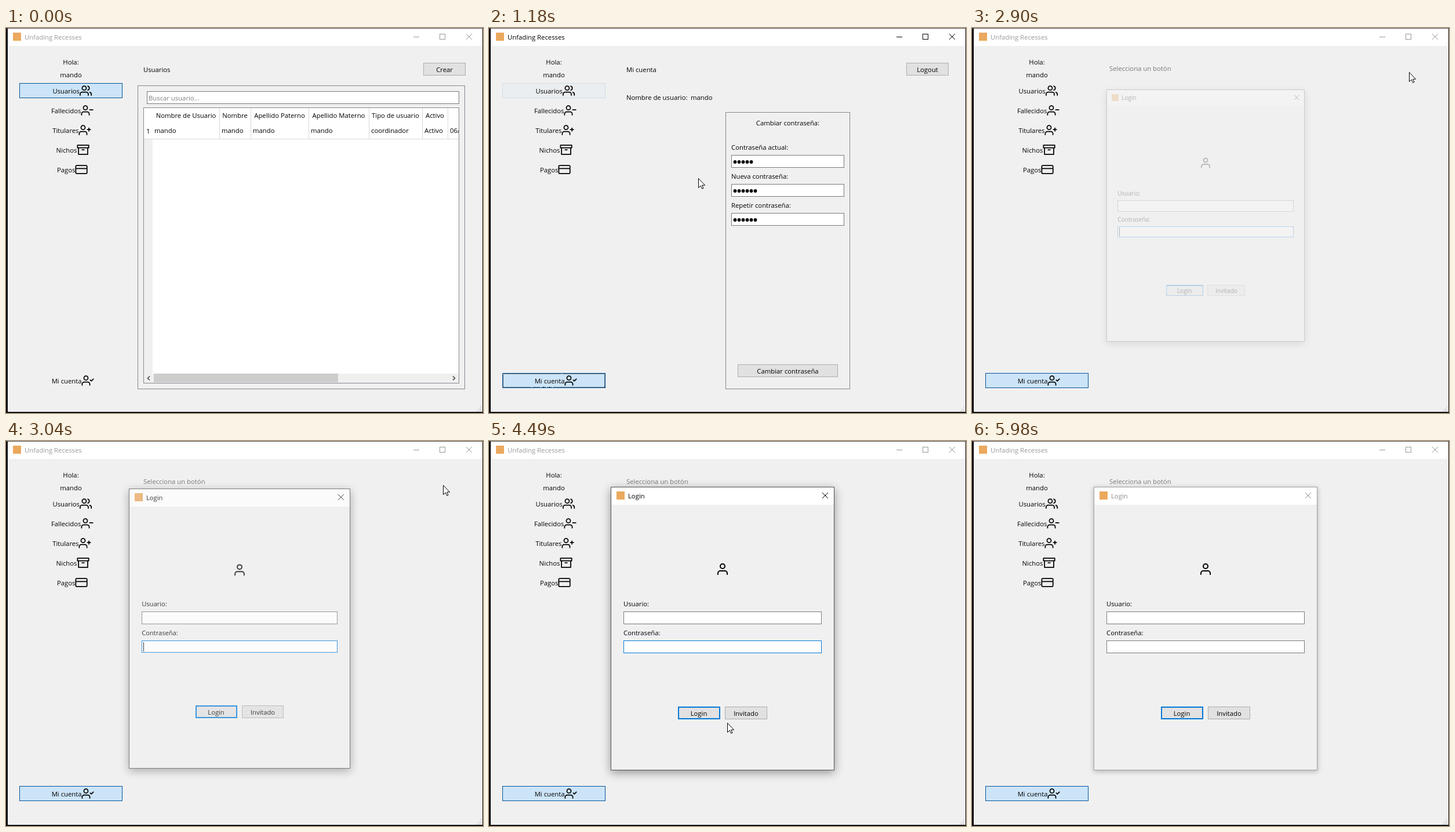
Animation, 823 px wide and 664 px high, one loop 6040 ms. Source, as an HTML page:

```html
<!DOCTYPE html>
<html lang="es">
<head>
<meta charset="utf-8">
<title>Unfading Recesses</title>
<style>
  html, body { margin: 0; width: 100%; height: 100%; overflow: hidden; background: #0d0d0d; }
  #stage { display: block; width: 823px; height: 664px; font: 11.3px "Open Sans", "Noto Sans", sans-serif; }
  text { white-space: pre; }
  rect, .crisp { shape-rendering: crispEdges; }
  .icon { fill: none; stroke: #000; stroke-width: 2; stroke-linecap: round; stroke-linejoin: round; }
  .chrome { fill: none; stroke: currentColor; }
  .caption { fill: currentColor; }
  #dialog { transform-origin: 403px 323.5px; }
</style>
</head>
<body>
<svg id="stage" viewBox="0 0 823 664"></svg>
<script>
const LOOP = 6040, STEP = 70;
const FACE = '#f0f0f0', FRAME = '#828790', FIELD = '#7a7a7a', ACCENT = '#0078d7', DEEP = '#005499', CHECKED = '#cce4f7';
const USER = 'mando';

// Markup helpers
const text = (x, y, s, attrs = '') => `<text x="${x}" y="${y}" ${attrs}>${s}</text>`;
const centered = (x, y, s, attrs = '') => text(x, y, s, `text-anchor="middle" ${attrs}`);
const fill = (x, y, w, h, color, attrs = '') => `<rect x="${x}" y="${y}" width="${w}" height="${h}" fill="${color}" ${attrs}/>`;
const box = (x, y, w, h, color, line, attrs = '') =>
  fill(x + .5, y + .5, w - 1, h - 1, color, `stroke="${line}" ${attrs}`);
const line = (d, color) => `<path class="crisp" d="${d}" fill="none" stroke="${color}"/>`;
const group = (id, ...parts) => `<g id="${id}">${parts.join('')}</g>`;
const button = (x, y, w, label, id = '') =>
  box(x, y, w, 22, '#e1e1e1', '#adadad', id && `id="${id}"`) + centered(x + w / 2, y + 16, label);
const field = (x, y, w, attrs) => box(x, y, w, 22, '#fff', FIELD, attrs);
const dots = (x, y, n) => Array.from({ length: n }, (_, i) => `<circle cx="${x + 7 * i}" cy="${y}" r="2.9"/>`).join('');
const cross = (x, y) => `<path class="chrome" d="M${x} ${y}l10 10m0-10l-10 10"/>`;
const icon = (x, y, scale, d) =>
  `<path class="icon" transform="translate(${x} ${y}) scale(${scale})" d="${d}"/>`;

const head = x => `M${x} 3a4 4 0 1 0 0 8a4 4 0 0 0 0-8`;
const shoulders = (left, right) => `M${right} 21v-2a4 4 0 0 0-4-4H${left + 4}a4 4 0 0 0-4 4v2`;
const person = shoulders(1, 16) + head(8.5);
const menu = [
  ['Usuarios', 127, 108, shoulders(1, 17) + head(9) + 'M23 21v-2a4 4 0 0 0-3-3.87M16 3.13a4 4 0 0 1 0 7.75'],
  ['Fallecidos', 129.5, 142, person + 'M23 11h-6'],
  ['Titulares', 125.5, 176, person + 'M20 8v6M23 11h-6'],
  ['Nichos', 122.5, 210, 'M21 8v13H3V8M1 3h22v5H1zM10 12h4'],
  ['Pagos', 119.5, 244, 'M3 4h18a2 2 0 0 1 2 2v12a2 2 0 0 1-2 2H3a2 2 0 0 1-2-2V6a2 2 0 0 1 2-2zM1 10h22'],
  ['Mi cuenta', 130.5, 608, person + 'M17 11l2 2 4-4']
].map(([label, x, y, d]) => text(x, y + 5, label, 'text-anchor="end"') + icon(x, y - 10.5, .88, d)).join('');

const columns = [
  [253, 'Nombre de Usuario', USER], [368, 'Nombre', USER], [422, 'Apellido Paterno', USER],
  [522, 'Apellido Materno', USER], [626, 'Tipo de usuario', 'coordinador'], [718, 'Activo', 'Activo'], [762, '', '06/']
];
const cells = columns.map(([x, title, value], i) => {
  const next = columns[i + 1];
  return (next ? centered((x + next[0]) / 2, 155, title) : '') +
    text(x + (i ? 4 : 3), 181, value) + (i ? line(`M${x + .5} 138V191`, '#d9d9d9') : '');
}).join('');

const usersPage = group('users',
  text(237, 76, 'Usuarios'), button(720, 60, 73, 'Crear'),
  box(227, 99, 565, 524, 'none', FRAME),
  field(243, 109, 539), text(246, 125, 'Buscar usuario...', 'fill="#808080"'),
  box(237, 137, 545, 476, '#fff', FRAME),
  fill(238, 192, 15, 404, FACE), text(242, 182, '1'),
  `<svg width="781" height="664">${cells}</svg>`,
  line('M238 191.5H781', '#d9d9d9'),
  fill(238, 596, 543, 16, FACE), fill(255, 596, 318, 15, '#cdcdcd'),
  '<path d="M248 600.5l-3.5 3.5 3.5 3.5M771 600.5l3.5 3.5-3.5 3.5" fill="none" stroke="#444" stroke-width="1.6"/>');

const password = (y, label, n) => text(418, y, label) + field(418, y + 9, 195) + dots(424.5, y + 21, n);
const accountPage = group('account',
  text(237, 76, 'Mi cuenta'), button(720, 60, 73, 'Logout', 'logout'),
  text(237, 124, 'Nombre de usuario:'), text(348, 124, USER),
  box(408, 145, 215, 478, 'none', FRAME), centered(515.5, 168, 'Cambiar contraseña:'),
  password(210, 'Contraseña actual:', 5),
  password(260, 'Nueva contraseña:', 6),
  password(310, 'Repetir contraseña:', 6),
  button(429, 580, 173, 'Cambiar contraseña'));

const dialog = group('dialog',
  box(210, 79, 386, 489, FACE, '#555', 'id="outline"'), fill(211, 80, 384, 30, '#fff'),
  fill(220, 87, 14, 14, '#eba95f'),
  group('dialogBar', text(240, 99, 'Login', 'class="caption"'), cross(575, 89)),
  icon(391, 209, 1, shoulders(4, 20) + head(12)),
  text(232, 285, 'Usuario:'), field(232, 294, 342),
  text(232, 335, 'Contraseña:'), field(232, 344, 342, 'id="secret"'),
  fill(235, 347, 1, 16, '#000', 'id="caret"'),
  fill(327, 459, 71, 20, '#e1e1e1', `stroke="${ACCENT}" stroke-width="2"`), centered(362, 474, 'Login'),
  button(407, 458, 73, 'Invitado'));

document.getElementById('stage').innerHTML = [
  fill(0, 0, 823, 664, '#0d0d0d'), fill(0, 0, 823, 1, '#484848'),
  fill(3, 1, 819, 661, FACE), fill(3, 1, 819, 30, '#fff'),
  fill(12, 8, 14, 14, '#eba95f'),
  group('mainBar', text(32, 20, 'Unfading Recesses', 'class="caption"'),
    '<path class="chrome crisp" d="M703 15.5h10M748.5 10.5h9v9h-9z"/>', cross(794, 10)),
  line('M818 653h2m-5 4h2m1 0h2m-8 3h2m1 0h2m1 0h2', '#b4b4b4'),
  centered(112, 63, 'Hola:'), centered(112, 85, USER),
  box(23, 95, 178, 26, CHECKED, DEEP, 'id="usersTab"'),
  group('accountTab', box(23, 595, 178, 26, CHECKED, DEEP, 'id="accountFace"'),
    box(24, 596, 176, 24, 'none', '#000', 'id="focus" stroke-dasharray="1 1"')),
  menu, usersPage, accountPage,
  text(237, 74, 'Selecciona un botón', 'id="hint" fill="#787878"'),
  dialog,
  group('pointer', '<circle id="click" cx="-1" cy="-1" r="11.5" fill="#f7ea28" fill-opacity=".75"/>',
    '<path d="M.5.5V16.5L4.2 13 6.7 18.3 9 17.3 6.6 12.2H11.6Z" fill="#fff" stroke="#000"/>')
].join('');

const $ = Object.fromEntries([...document.querySelectorAll('[id]')].map(e => [e.id, e]));
const show = (el, on) => el.style.display = on ? '' : 'none';
const paint = (el, face, edge) => { el.style.fill = face; el.style.stroke = edge; };
const clamp = v => Math.max(0, Math.min(1, v));
const smooth = p => p * p * (3 - 2 * p);
const linear = p => p;
const within = (t, a, b) => t >= a && t < b;

// Pointer strokes: start time, step count, easing, then quadratic curve points
const strokes = [
  [70, 9, smooth, [719, 648], [400, 500], [100, 611]],
  [1040, 5, linear, [100, 611], [293, 251], [567, 113]],
  [1520, 9, smooth, [567, 113], [670, 86], [754, 76]],
  [3180, 10, smooth, [754, 76], [580, 300], [411, 486]],
  [5220, 8, p => p ** 1.5, [411, 486], [640, 590], [850, 690]]
];

function pointerAt(t) {
  const [start, count, ease, a, b, c] = strokes.findLast(s => t >= s[0]) || strokes[0];
  const first = start === 70 ? 0 : 1;
  const p = ease(clamp((Math.floor((t - start) / STEP) + first) / (count - 1 + first)));
  return [0, 1].map(i => (1 - p) ** 2 * a[i] + 2 * p * (1 - p) * b[i] + p * p * c[i]);
}

function draw(t) {
  const active = within(t, 830, 2900), changed = t >= 970;
  $.mainBar.style.color = active ? '#000' : '#999';
  show($.users, !changed);
  show($.account, within(t, 970, 2760));
  show($.hint, t >= 2760);

  $.usersTab.style.opacity = 1 - clamp((t - 970) / 240);
  show($.accountTab, t >= 830);
  show($.focus, active);
  paint($.accountFace, changed ? CHECKED : '#e4eef7', changed ? DEEP : '#7fa9cc');

  const [x, y] = pointerAt(t);
  show($.pointer, within(t, 70, 5710));
  $.pointer.setAttribute('transform', `translate(${Math.round(x)} ${Math.round(y)})`);
  const pressing = within(t, 2150, 2290);
  show($.click, within(t, 830, 970) || pressing);

  const hover = x > 720 && y < 82;
  paint($.logout, pressing ? CHECKED : hover ? '#e5f1fb' : '#e1e1e1',
    pressing ? DEEP : hover ? ACCENT : '#adadad');

  const opened = clamp((Math.floor((t - 2900) / STEP) + 1) / 4), focused = t < 5980;
  show($.dialog, opened > 0);
  $.dialog.style.opacity = opened;
  $.dialog.style.transform = `scale(${1 - .2 * (1 - opened) ** 2})`;
  $.dialog.style.filter = focused ? 'drop-shadow(0 4px 8px #0006)' : 'drop-shadow(0 2px 4px #0004)';
  $.dialogBar.style.color = focused ? '#000' : '#8c8c8c';
  $.outline.style.stroke = focused ? '#555' : '#a0a0a0';
  $.secret.style.stroke = focused ? ACCENT : FIELD;
  show($.caret, focused && (t - 2900) % 1060 < 530);
}

function tick() {
  draw(performance.now() % LOOP);
  requestAnimationFrame(tick);
}
tick();
</script>
</body>
</html>
```
